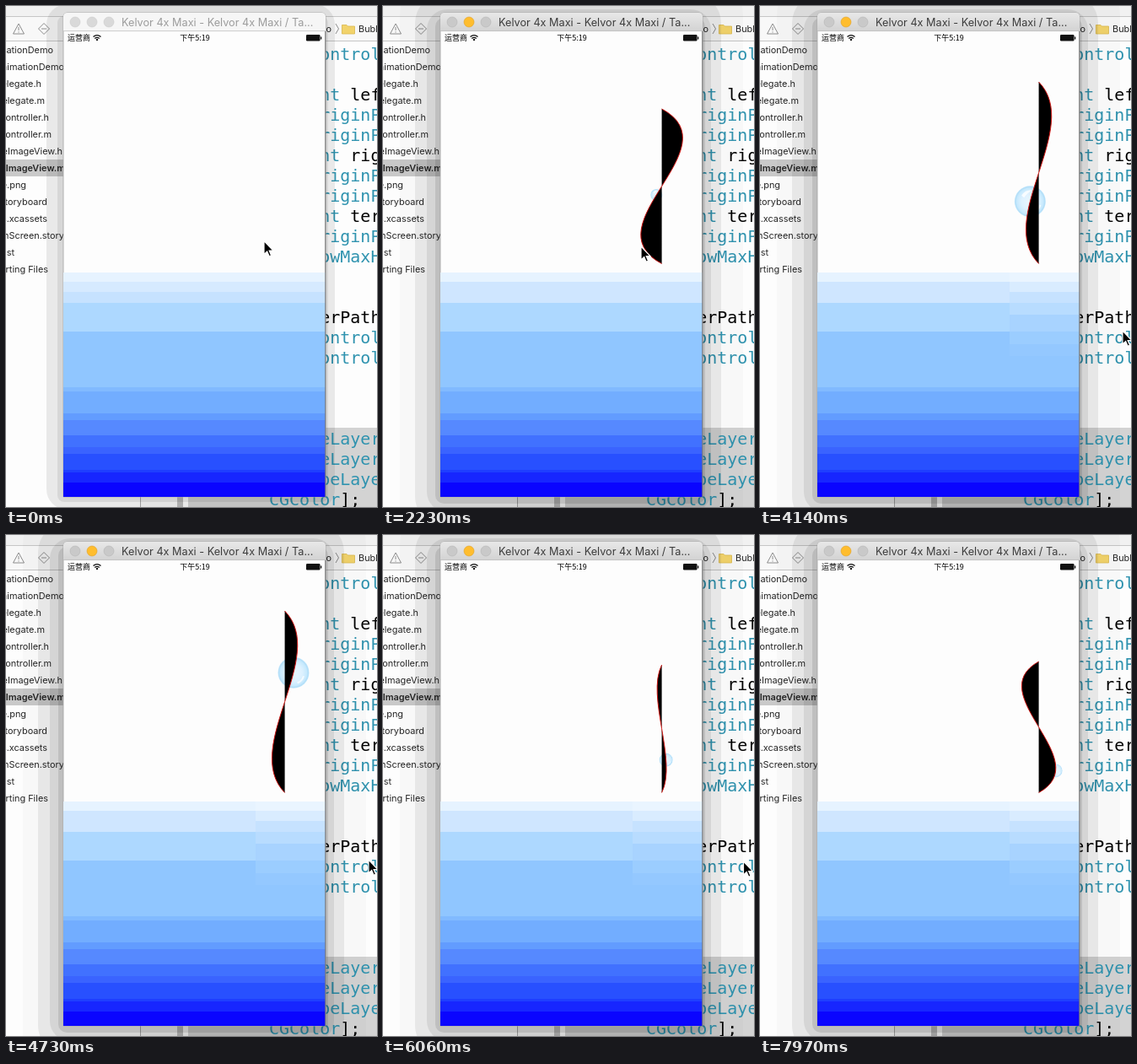
Animation of 440 by 594 pixels, one loop 8000 ms. Source, as an HTML page:

```html
<!DOCTYPE html>
<html lang="zh">
<head>
<meta charset="utf-8">
<title>Bubble path demo</title>
<style>
  html, body { margin: 0; width: 100%; height: 100%; overflow: hidden; background: #fdfdfd; }
  svg { display: block; width: 440px; height: 594px; }
  text { white-space: pre; }
  .ui { font: 10.9px Inter, sans-serif; fill: #262626; }
  .code { font: 20px "DejaVu Sans Mono", monospace; fill: #000; }
  .code .t { fill: #2f93af; }
  .title { font: 12.7px Inter, sans-serif; }
  .status { font: 9px "Noto Sans CJK SC", "Noto Sans CJK", sans-serif; fill: #000; }
</style>
</head>
<body>
<svg id="stage" viewBox="0 0 440 594" xmlns="http://www.w3.org/2000/svg">
  <defs>
    <linearGradient id="bar" x1="0" y1="0" x2="0" y2="1">
      <stop offset="0" stop-color="#e8e8e8"/><stop offset="1" stop-color="#d2d2d2"/>
    </linearGradient>
    <radialGradient id="film">
      <stop offset="0" stop-color="#e6f5ff" stop-opacity=".85"/>
      <stop offset=".55" stop-color="#daf0ff" stop-opacity=".9"/>
      <stop offset=".85" stop-color="#c6e9fd"/>
      <stop offset=".94" stop-color="#b2def8"/>
      <stop offset="1" stop-color="#c4e7fb"/>
    </radialGradient>
    <clipPath id="screen"><rect x="68" y="30" width="311" height="552"/></clipPath>
  </defs>

  <rect width="440" height="594" fill="#fdfdfd"/>
  <rect width="440" height="13" fill="#f1f1f1"/>
  <rect y="13" width="440" height="28" fill="#f8f8f8"/>
  <path d="M0 12.5H440M0 41.5H440" stroke="#c6c6c6"/>
  <g fill="none" stroke="#8c8c8c" stroke-linejoin="round">
    <path d="M15 21L21.5 33H8.500Z"/>
    <path d="M15 25V29M15 30.300V31.500"/>
    <path d="M45 20.500L51.500 27L45 33.500L38.500 27Z"/>
    <path d="M42 27H48"/>
    <path d="M391 21L394.500 27L391 33"/>
  </g>
  <path d="M398.500 22.500H404L405.500 24H413.500V33H398.500Z" fill="#f2d36b" stroke="#d9b64c" stroke-width=".8"/>
  <text class="ui" x="386" y="31" text-anchor="end">BubbleAnimationDemo</text>
  <text class="ui" x="418" y="31">Bubble</text>

  <rect y="182" width="68" height="20" fill="#c9c9c9"/>
  <g id="files" class="ui" text-anchor="end"></g>

  <path d="M160 582H203V594H160Z" fill="#f6f6f6"/>
  <path d="M159.500 582V594" stroke="#a8a8a8"/>
  <rect x="203" y="582" width="7" height="12" fill="#bcbcbc"/>
  <path d="M216 582H378V500H440V594H216Z" fill="#d3d3d3"/>
  <g id="code" class="code"></g>

  <g id="dimShade"></g>
  <g id="litShade"></g>

  <path d="M68 582V13Q68 8 73 8H374Q379 8 379 13V582Z" fill="#fdfdfd" stroke="#a3a3a3" stroke-width=".8"/>
  <path id="bar1" d="M68 30V13Q68 8 73 8H374Q379 8 379 13V30Z"/>
  <path d="M68 29.600H379" stroke="#bdbdbd" stroke-width=".7"/>
  <g id="lights"></g>
  <text id="title" class="title" x="137" y="24">Kelvor 4x Maxi - Kelvor 4x Maxi / Ta...</text>

  <text class="status" x="73" y="41">运营商</text>
  <text class="status" x="224" y="41" text-anchor="middle" font-weight="700">下午5:19</text>
  <g fill="none" stroke="#111" stroke-width="1.400">
    <path d="M103.500 36.500Q108 32.800 112.500 36.500M105.200 38.500Q108 36.300 110.800 38.500"/>
    <circle cx="108" cy="40" r=".5"/>
  </g>
  <rect x="356" y="34" width="16.500" height="7.500" rx="1.200" fill="#111"/>
  <path d="M373.700 36.500V39.500" stroke="#111" stroke-width="1.300"/>

  <g id="water"></g>
  <g id="merged"><rect x="68" y="327" width="311" height="25" fill="#cfe6ff"/></g>
  <g id="soft"></g>
  <path d="M378.800 30V582" stroke="#777"/>

  <g clip-path="url(#screen)">
    <g id="bubble">
      <circle r="1" fill="url(#film)"/>
      <path d="M-.55 -.38Q-.3 -.78 .15 -.72Q-.2 -.55 -.38 -.25Z" fill="#fff" opacity=".8"/>
      <path d="M.25 .66Q.55 .55 .65 .22" fill="none" stroke="#fff" stroke-width=".12" opacity=".7"/>
    </g>
    <path id="curve" fill="#000" stroke="#d01410" stroke-width="1"/>
  </g>
  <path id="cursor" d="M0 0V16L3.700 12.600L6.200 18.200L8.600 17.200L6.200 11.600H11Z" fill="#000" stroke="#fff" stroke-width="1.200"/>
</svg>
<script>
const $ = id => document.getElementById(id);
const NS = "http://www.w3.org/2000/svg";
const LOOP = 8000, ACTIVE = 1340, STEP = 147.35;

function add(parent, tag, attrs, text) {
  const el = document.createElementNS(NS, tag);
  for (const k in attrs) el.setAttribute(k, attrs[k]);
  if (text) el.textContent = text;
  return parent.appendChild(el);
}

// Sidebar: each name with its right edge
const SELECTED = 7;
[["AnimationDemo", 56], ["AnimationDemo", 69], ["AppDelegate.h", 42], ["AppDelegate.m", 46],
 ["ViewController.h", 51], ["ViewController.m", 54], ["BubbleImageView.h", 67],
 ["BubbleImageView.m", 70], ["bubble.png", 24], ["Main.storyboard", 49],
 ["Assets.xcassets", 49], ["LaunchScreen.story", 69], ["Info.plist", 10],
 ["Supporting Files", 50]
].forEach(([s, x], i) => add($("files"), "text",
  { x, y: 56 + i * 20, "font-weight": i === SELECTED ? 600 : 400 }, s));

// Code: row, type part, plain part
[[0, "ontrol"], [2, "nt", " lef"], [3, "riginP"], [4, "riginP"], [5, "nt", " rig"],
 [6, "riginP"], [7, "riginP"], [8, "nt", " ter"], [9, "riginP"], [10, "owMaxH"],
 [13, "", "erPath"], [14, "ontrol"], [15, "ontrol"], [19, "eLayer"], [20, "eLayer"],
 [21, "peLayer"], [22, "CGColor", "];"]
].forEach(([row, type, plain]) => {
  const line = add($("code"), "text", { x: row === 22 ? 312 : 372.2, y: 64 + row * 24 });
  if (type) add(line, "tspan", { class: "t" }, type);
  if (plain) add(line, "tspan", {}, plain);
});

function shade(group, layers) {
  for (const [l, r, top, bottom, rx, opacity] of layers)
    add(group, "rect", { x: l, y: top, width: r - l, height: bottom - top, rx, opacity });
}
shade($("dimShade"), [[48, 390, -2, 597, 24, .08], [61, 382, 12, 588, 8, .08]]);
shade($("litShade"), [[20, 427, -30, 640, 40, .02], [38, 401, -14, 616, 34, .07],
                      [52, 389, 4, 600, 24, .08], [62, 382, 14, 590, 10, .1]]);

const lights = [82, 102, 122].map(cx =>
  add($("lights"), "circle", { cx, cy: 19, r: 6, "stroke-width": .6 }));

function bands(group, x, list, end) {
  list.forEach(([y, fill], i) => {
    const next = i + 1 < list.length ? list[i + 1][0] : end;
    add(group, "rect", { x, y, width: 379 - x, height: next - y, fill });
  });
}
bands($("water"), 68, [
  [316, "#e6f3ff"], [327, "#d6eaff"], [339, "#c6e2ff"], [352, "#add8ff"], [386, "#90c6ff"],
  [452, "#81baff"], [457, "#72adff"], [483, "#629cff"], [491, "#5689ff"], [509, "#4171ff"],
  [523, "#3a63ff"], [531, "#2850ff"], [550, "#1f3eff"], [553, "#1726ff"], [565, "#0a05ff"]
], 582);
bands($("soft"), 296, [
  [316, "#eaf5ff"], [327, "#d9ecff"], [339, "#c6e2ff"], [352, "#b8dcff"],
  [366, "#a8d3ff"], [386, "#9bcdff"], [401, "#94c8ff"]
], 415);

// One rise: start, duration, top of path, sideways pull, radius
const rises = [
  { start: 1335, dur: 2000, top: 122, pull: 86, r: 7 },
  { start: 3497, dur: 1870, top: 90, pull: 52.5, r: 18.5 },
  { start: 5579, dur: 1850, top: 154, pull: -19, r: 8 },
  { start: 7620, dur: 1850, top: 150, pull: -70, r: 8 }
];
const X = 330.6, BASE = 305.5, POP = 150;

function curveOf({ top, pull }) {
  const q = (BASE - top) / 4;
  return `M${X} ${BASE}C${X - pull} ${BASE - q} ${X + pull} ${top + q} ${X} ${top}`;
}

const mouse = [
  [0, 306, 278.5], [300, 306, 280], [600, 306, 283], [750, 306, 285], [2370, 306, 285],
  [2700, 385, 385], [2850, 424, 399], [3000, 430, 385], [5920, 430, 385],
  [6050, 427.5, 387], [7300, 427.5, 387], [7700, 454, 392]
];

function mouseAt(t) {
  const i = mouse.findIndex(k => k[0] > t);
  if (i < 0) return mouse[mouse.length - 1].slice(1);
  const a = mouse[i - 1], b = mouse[i], f = (t - a[0]) / (b[0] - a[0]);
  return [a[1] + (b[1] - a[1]) * f, a[2] + (b[2] - a[2]) * f];
}

function tick(t) {
  if (t < ACTIVE) return t < 300 ? 0 : t < 600 ? 300 : t < 750 ? 600 : 750;
  return ACTIVE + Math.floor((t - ACTIVE + 8) / STEP) * STEP;
}

const show = (id, on) => $(id).setAttribute("visibility", on ? "visible" : "hidden");

function drawRise(t) {
  const rise = rises.filter(r => r.start <= t).pop();
  show("curve", rise);
  if (!rise) return show("bubble", false);
  const curve = $("curve");
  curve.setAttribute("d", curveOf(rise));
  const age = t - rise.start;
  const p = Math.min(1, age / rise.dur);
  const pop = Math.max(0, age - rise.dur) / POP;
  show("bubble", pop < 1);
  const at = curve.getPointAtLength(p * curve.getTotalLength());
  const r = rise.r * (pop > 0 ? 1.3 : 1);
  $("bubble").setAttribute("transform", `translate(${at.x} ${at.y}) scale(${r})`);
  $("bubble").setAttribute("opacity", pop > 0 ? .6 : Math.min(1, .5 + 2 * p));
}

function draw(time) {
  const t = tick(time), on = t >= ACTIVE;
  show("dimShade", !on);
  show("litShade", on);
  show("merged", on);
  show("soft", t >= 2500);
  $("bar1").setAttribute("fill", on ? "url(#bar)" : "#f6f6f6");
  $("title").setAttribute("fill", on ? "#3c3c3c" : "#9c9c9c");
  lights.forEach((c, i) => {
    const lit = on && i === 1;
    c.setAttribute("fill", lit ? "#ffbd2e" : on ? "#c9c9c9" : "#d9d9d9");
    c.setAttribute("stroke", lit ? "#e0a028" : on ? "#b5b5b5" : "#cbcbcb");
  });
  const [x, y] = mouseAt(t);
  $("cursor").setAttribute("transform", `translate(${x} ${y})`);
  drawRise(t);
}

const begin = performance.now();
function frame() {
  draw((performance.now() - begin) % LOOP);
  requestAnimationFrame(frame);
}
draw(0);
requestAnimationFrame(frame);
</script>
</body>
</html>
```
